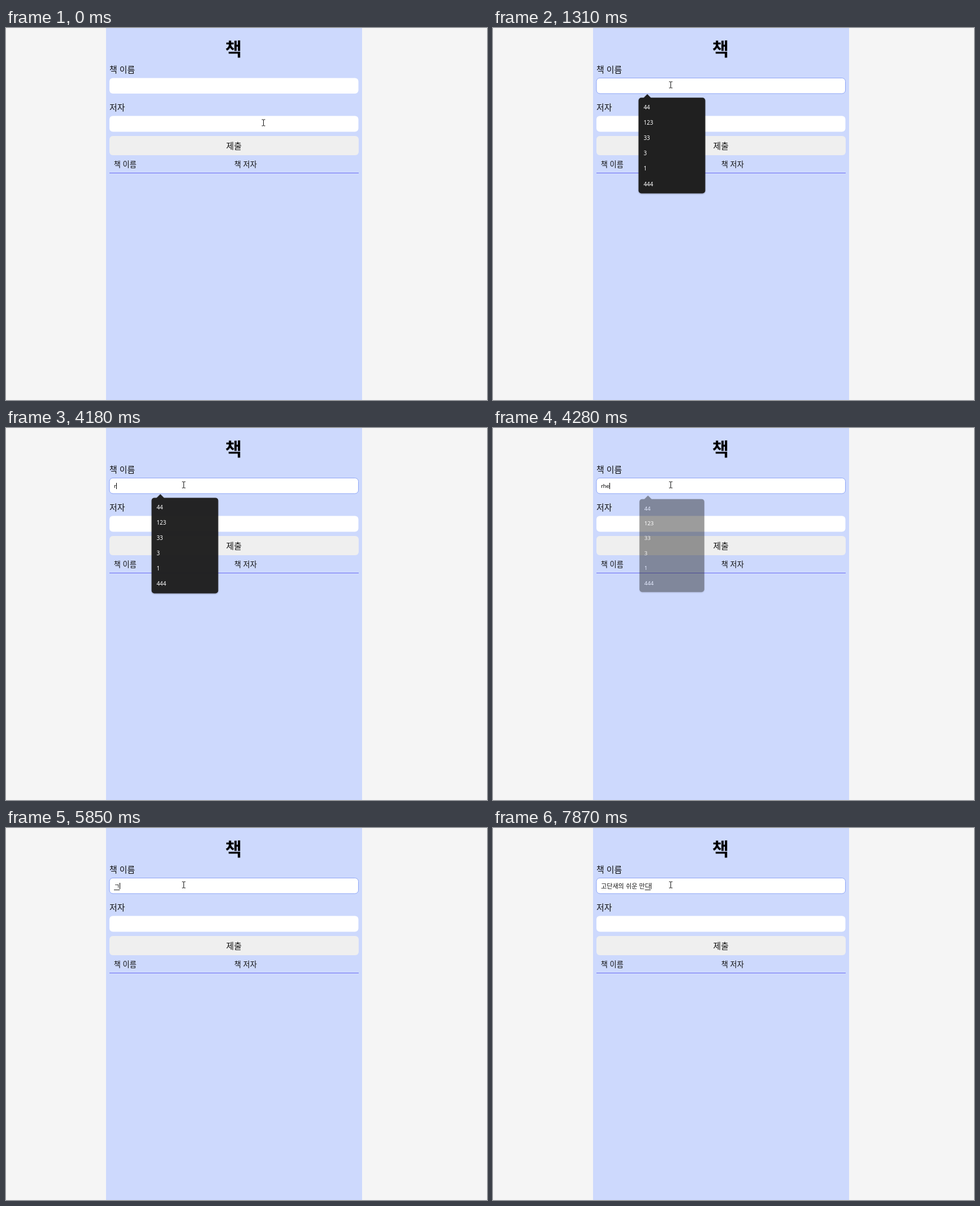
An HTML page that plays this animation: 851x658 px, repeating every 7.99 s.

```html
<!DOCTYPE html>
<html lang="ko">
<head>
<meta charset="utf-8">
<title>책</title>
<style>
  html, body { margin: 0; width: 100%; height: 100%; overflow: hidden; background: #f5f5f5; }
  svg { display: block; width: 100%; height: 100%; }
  text { font: 14.9px "Noto Sans CJK KR", "Noto Sans CJK", sans-serif; fill: #111; white-space: pre; }
  .title { font-size: 32px; font-weight: 700; fill: #000; }
  .cell { font-size: 13.2px; }
  .hangul { font-size: 11.1px; }
  .latin { font: 10.35px Lato, sans-serif; }
  #popup text { font: 9.9px "Noto Sans", sans-serif; fill: #fff; }
  #popup { filter: drop-shadow(0 1px 1px rgba(0, 0, 0, .3)); }
</style>
</head>
<body>
<svg viewBox="0 0 851 658">
  <rect width="851" height="658" fill="#f5f5f5"/>
  <rect x="177" width="453" height="658" fill="#cdd9fd"/>
  <text class="title" x="402.5" y="49" text-anchor="middle">책</text>
  <text x="183" y="79">책 이름</text>
  <rect id="field" x="183" y="88.5" width="440.5" height="27.5" rx="6" fill="#fff"/>
  <text x="183" y="146">저자</text>
  <rect x="183" y="155.5" width="440.5" height="28" rx="6" fill="#fff"/>
  <rect x="183" y="191" width="441" height="34" rx="6" fill="#efefef"/>
  <text x="403.2" y="213.5" text-anchor="middle">제출</text>
  <text class="cell" x="190.7" y="245.7">책 이름</text>
  <text class="cell" x="403.7" y="245.7">책 저자</text>
  <rect x="183" y="256" width="441" height="1" fill="#6b6cf5"/>

  <text id="typed" x="191"></text>
  <rect id="underline" y="109" height="1" fill="#222"/>
  <rect id="caret" y="97" width="1" height="11" fill="#000"/>

  <g id="popup">
    <path d="M266 124l7-7 7 7z" fill="#202020"/>
    <rect x="257.5" y="123.3" width="118" height="169.2" rx="5" fill="#202020"/>
  </g>

  <path id="beam" d="M-3-5.5h2.5l.5.5.5-.5h2.5M0-5v10M-3 5.5h2.5l.5-.5.5.5h2.5" fill="none" stroke="#111"/>
  <path id="arrow" d="M0 0v16l3.7-3.5 2.5 5.8 2.3-1-2.5-5.6h5.2z" fill="#fff" stroke="#000"/>
</svg>
<script>
const LOOP = 7990;
const FOCUS = 700;
const LEFT = 191;
const $ = id => document.getElementById(id);
const [field, typed, underline, caret, popup, beam, arrow] =
  ['field', 'typed', 'underline', 'caret', 'popup', 'beam', 'arrow'].map($);

// Each list holds [start time, value]; the value lasts until the next entry.
const typing = [
  [0, ''],
  [4180, 'r'], [4230, 'rh'], [4280, 'rhe'], [4380, 'rhek'],
  [4480, 'rheks'], [4530, 'rhekst'], [4630, 'rheksto'],
  [4930, 'rhekst'], [5480, 'rheks'], [5530, 'rhek'], [5580, 'rhe'], [5650, 'r'], [5700, ''],
  [5850, 'ㄱ'], [5950, '고'], [6000, '곧'], [6100, '고다'], [6150, '고단'],
  [6300, '고단ㅅ'], [6350, '고단새'], [6450, '고단생'], [6500, '고단새으'],
  [6550, '고단새의'], [6650, '고단새의 '],
  [6800, '고단새의 ㅅ'], [6970, '고단새의 수'], [7020, '고단새의 쉬'],
  [7170, '고단새의 슁'], [7220, '고단새의 쉬우'], [7270, '고단새의 쉬운'], [7370, '고단새의 쉬운 '],
  [7470, '고단새의 쉬운 ㅁ'], [7520, '고단새의 쉬운 마'], [7620, '고단새의 쉬운 만'],
  [7820, '고단새의 쉬운 만ㄷ'], [7870, '고단새의 쉬운 만다']
];
const blinking = [
  [0, false], [FOCUS, true], [1310, false], [1810, true], [2370, false], [2870, true],
  [3380, false], [3920, true], [5130, false], [5480, true]
];
const popupAlpha = [
  [0, 0], [750, .4], [800, .75], [850, 1],
  [4180, .98], [4230, .72], [4280, .44], [4330, .16], [4380, 0]
];

const valueAt = (list, t) => list.findLast(([start]) => start <= t)[1];

const suggestions = ['44', '123', '33', '3', '1', '444'];
suggestions.forEach((label, i) => {
  const text = document.createElementNS(popup.namespaceURI, 'text');
  text.setAttribute('x', 266.4);
  text.setAttribute('y', 143.8 + i * 27.15);
  text.textContent = label;
  popup.append(text);
});

function drawText(t) {
  const text = valueAt(typing, t);
  const isHangul = /[^a-z]/.test(text);
  const composing = isHangul && !text.endsWith(' ');
  typed.setAttribute('class', isHangul ? 'hangul' : 'latin');
  typed.setAttribute('y', isHangul ? 107.3 : 106);
  typed.textContent = text;

  const width = text ? typed.getComputedTextLength() : 0;
  const last = composing ? typed.getSubStringLength(text.length - 1, 1) : 0;
  underline.setAttribute('x', LEFT + width - last);
  underline.setAttribute('width', last);
  caret.setAttribute('x', Math.round(LEFT + width));
  caret.style.opacity = valueAt(blinking, t) ? 1 : 0;
}

function drawPopup(t) {
  const alpha = valueAt(popupAlpha, t);
  const scale = 1 - .05 * (1 - alpha);
  popup.style.opacity = alpha;
  popup.setAttribute('transform',
    `translate(316.5 207.8) scale(${scale}) translate(-316.5 -207.8)`);
}

function drawPointer(t) {
  const step = Math.floor(t / 50) * 50;
  const p = Math.min(1, Math.max(0, (step - 100) / 550));
  const u = p * p * (3 - 2 * p);
  const curve = (a, b, c) => a * (1 - u) ** 2 + 2 * b * u * (1 - u) + c * u * u;
  const x = Math.round(curve(455, 340, 314)) + .5;
  const y = Math.round(curve(167, -32, 100)) + .5;
  const overInput = (y > 88 && y < 116) || (y > 155 && y < 184);
  for (const [shape, shown] of [[beam, overInput], [arrow, !overInput]]) {
    shape.setAttribute('transform', `translate(${x} ${y})`);
    shape.style.opacity = shown ? 1 : 0;
  }
}

function frame() {
  const t = performance.now() % LOOP;
  field.setAttribute('stroke', t >= FOCUS ? '#8fa6f5' : 'none');
  drawText(t);
  drawPopup(t);
  drawPointer(t);
  requestAnimationFrame(frame);
}
frame();
</script>
</body>
</html>
```
